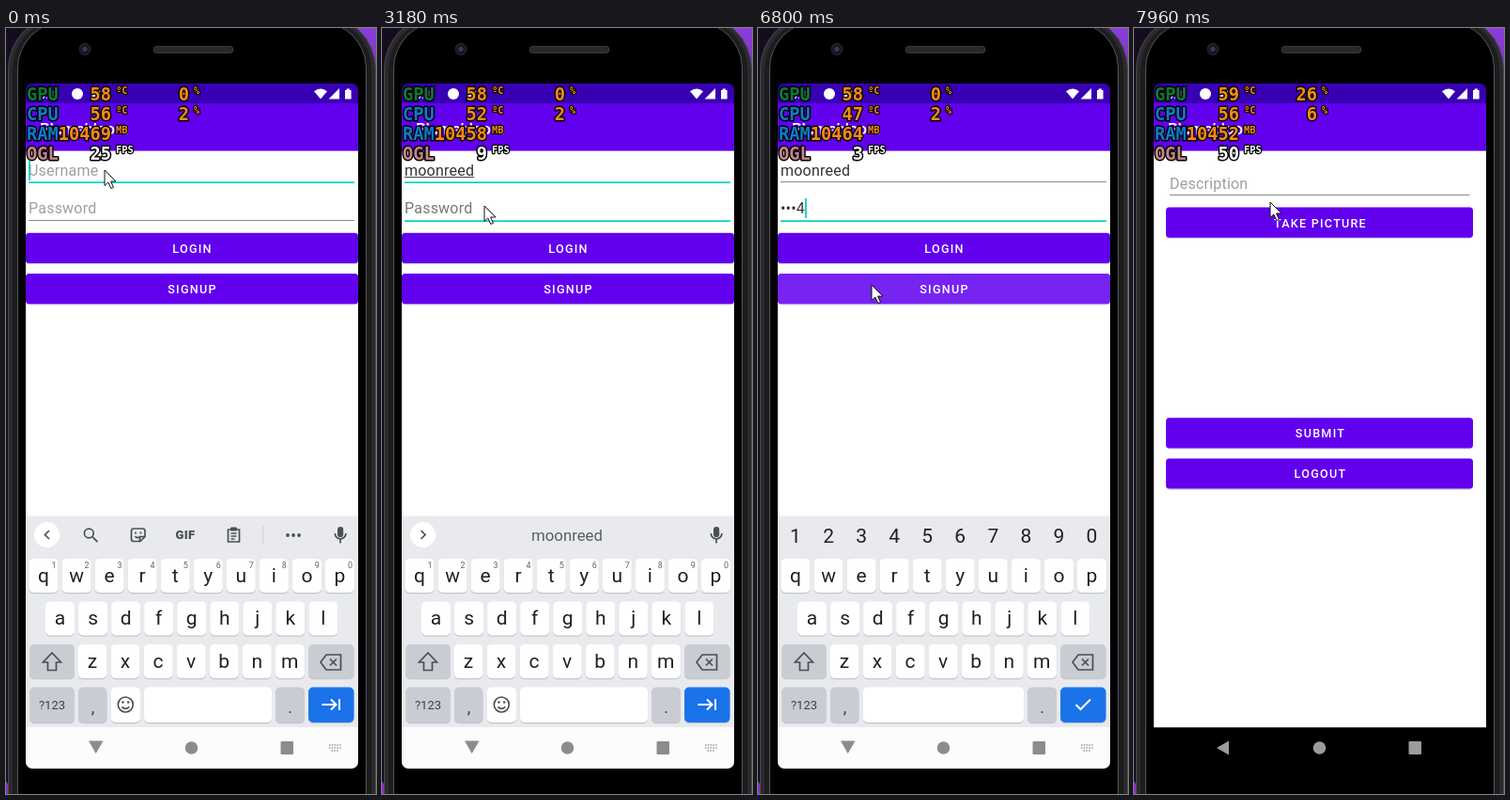
An HTML page for the animation above (8 s loop, 394x814 px).

```html
<!DOCTYPE html>
<html lang="en">
<head>
<meta charset="utf-8">
<title>Phone login</title>
<style>
html, body { margin: 0; width: 100%; height: 100%; overflow: hidden; background: #000; }
svg { display: block; width: 394px; height: 814px; font-family: Roboto, sans-serif; }
.mid { text-anchor: middle; }
.field { font-size: 16px; letter-spacing: .22px; fill: #333; }
.hint { fill: #9f9f9f; }
.btn { font-size: 12.6px; font-weight: 500; letter-spacing: 1.25px; fill: #fff; text-anchor: middle; }
.key { font-size: 21px; fill: #202124; text-anchor: middle; }
.sup { font-size: 9px; fill: #5f6368; text-anchor: middle; }
.word { font-size: 16.8px; fill: #5a5e63; text-anchor: middle; }
.line { fill: none; stroke: #4b4f54; stroke-width: 1.7; }
.hud { font: bold 18.7px "DejaVu Sans Mono", monospace; paint-order: stroke; stroke: #000; stroke-width: 3px; stroke-linejoin: round; }
.hud .unit { font-size: 10.3px; stroke-width: 2.4px; }
.end { text-anchor: end; }
</style>
</head>
<body>
<svg id="stage" viewBox="0 0 394 814"></svg>
<script>
const PURPLE = '#6200ee', TEAL = '#03d0c5';

const rect = (x, y, w, h, fill, r = 0, more = '') =>
  `<rect x="${x}" y="${y}" width="${w}" height="${h}" rx="${r}" fill="${fill}" ${more}/>`;
const text = (x, y, cls, str, more = '') =>
  `<text x="${x}" y="${y}" class="${cls}" ${more}>${str}</text>`;
const path = (d, more = 'class="line"') => `<path d="${d}" ${more}/>`;
const disc = (x, y, r, fill, more = '') =>
  `<circle cx="${x}" cy="${y}" r="${r}" fill="${fill}" ${more}/>`;
const group = (id, body, more = '') => `<g id="${id}" ${more}>${body}</g>`;

const button = (x, y, w, label, glow = '') =>
  rect(x + .5, y + 1, w - 1, 32.5, '#d9d6df', 4) + rect(x, y, w, 32.2, PURPLE, 3.5) + glow +
  text(198.5, y + 21, 'btn', label);

const key = (x, y, w, h, fill = '#fff') =>
  rect(x, y + 1.2, w, h, '#c3c6cb', 5) + rect(x, y, w, h, fill, 5);

const letters = (row, x0, y) => [...row].map((c, i) => {
  const x = x0 + i * 35.05;
  return key(x - 15.5, y, 31, 36) + text(x, y + 24.5, 'key', c);
}).join('');

const digits = (y, cls, dx) => [...'1234567890'].map((c, i) =>
  text(40 + dx + i * 35.05, y, cls, c)).join('');

function phone() {
  return `<defs>
    <linearGradient id="wall" x2="0" y2="1"><stop stop-color="#8a3fd8"/><stop offset=".12" stop-color="#6a2bb0"/><stop offset=".3" stop-color="#1a1022"/><stop offset="1" stop-color="#151018"/></linearGradient>
    <clipPath id="screen"><rect x="21" y="59" width="354" height="728" rx="7"/></clipPath>
    <clipPath id="signupBox"><rect x="21" y="261" width="354" height="32.2" rx="3.5"/></clipPath></defs>` +
    rect(0, 0, 394, 814, '#140d20') + rect(300, 0, 94, 814, 'url(#wall)') +
    path('M0 800V814H8Z', 'fill="#8a2bd8"') +
    rect(2.5, -14, 391, 1000, '#2b2b2e', 58, 'stroke="#4a4a4e"') +
    rect(7, -10, 382, 1000, '#1d1d20', 54) +
    rect(12.5, -7, 371, 1000, '#000', 50, 'stroke="#55555a"') +
    rect(157, 19.5, 85, 7, '#29292c', 3.5, 'stroke="#3a3a3d"') +
    disc(84, 22.5, 6, '#17181d', 'stroke="#2a2b31"') + disc(84, 22.5, 2.5, '#31405f');
}

const appBase = () =>
  rect(21, 130, 354, 613.5, '#fff') + rect(21, 59, 354, 21.5, '#3700b3') +
  rect(21, 80, 354, 50.6, PURPLE) + rect(21, 743.5, 354, 44, '#000') +
  text(36, 113, '', 'Plumebloom', 'font-size="16.6" font-weight="500" fill="#fff"');

const navShapes = (back, fill) => path(back, `fill="${fill}"`) +
  disc(197.5, 765, 6.7, fill) + rect(292.5, 758, 13.5, 14, fill, 1);

const login = () => appBase() +
  text(24, 157, 'field hint', 'Username', 'id="userHint"') + text(24, 157, 'field', '', 'id="user"') +
  rect(24, 158, 0, 1, '#444', 0, 'id="compose"') +
  rect(24, 163, 347, 2, TEAL, 0, 'id="userLine"') +
  text(24, 197, 'field hint', 'Password', 'id="passHint"') + text(24, 197, 'field', '', 'id="pass"') +
  rect(24, 204, 347, 1, '#8c8c8c', 0, 'id="passLine"') +
  rect(24, 141, 1.8, 21, TEAL, 0, 'id="caret"') +
  button(21, 217.7, 354, 'LOGIN') +
  button(21, 261, 354, 'SIGNUP', group('glow',
    rect(21, 261, 354, 33, '#fff', 0, 'opacity=".05"') +
    disc(121, 273, 0, '#fff', 'id="ripple" opacity=".09"'), 'clip-path="url(#signupBox)"'));

const post = () => appBase() +
  text(38, 170.5, 'field hint', 'Description') + rect(38, 177, 319.5, 1, '#8c8c8c') +
  button(34, 190.5, 327, 'TAKE PICTURE') + button(34, 414.2, 327, 'SUBMIT') +
  button(34, 457.4, 327, 'LOGOUT');

function keyboard() {
  const grey = '#c9ccd3';
  const mic = rect(353, 530, 6.2, 11, '#4b4f54', 3.1) + path('M350.3 537a5.8 5.8 0 0 0 11.6 0M356 543.5v4');
  const knob = d => disc(43.5, 538.5, 13.5, '#fff') + path(d);
  const tools = knob('M46 534l-4.5 4.5 4.5 4.5') +
    disc(88.3, 537, 4.9, 'none', 'class="line"') + path('M92 540.7l5.5 5.5') +
    path('M136 532h9.5a2.5 2.5 0 0 1 2.5 2.5v6l-5 5h-7a2.5 2.5 0 0 1-2.5-2.5v-8.5a2.5 2.5 0 0 1 2.5-2.5zM142.5 545v-4.5h5M138 535.5v2M143.5 535.5v2M137.5 540q2 2.5 4 1') +
    text(191, 543, 'mid', 'GIF', 'font-size="13" font-weight="900" fill="#4b4f54" letter-spacing=".4"') +
    path('M236.5 533h12v13h-12zM239.5 537h6M239.5 540h6M239.5 543h4') + rect(239, 530.5, 7, 4, '#4b4f54', 1) +
    rect(273, 529, 1, 20, '#cfd1d6') + [300, 306, 312].map(x => disc(x, 539, 1.9, '#4b4f54')).join('') + mic;
  const words = knob('M41.5 534l4.5 4.5-4.5 4.5') + mic +
    group('bars', rect(145, 528, 1, 22, '#cfd1d6') + rect(248, 528, 1, 22, '#cfd1d6')) +
    [100, 197, 294].map((x, i) => text(x, 545, 'word', '', `id="word${i}"`)).join('');
  const plain = digits(574, 'sup', 11) +
    key(112, 700.5, 31, 37.5) + disc(127.3, 719, 8, 'none', 'class="line"') +
    path('M123.3 721.3q4 4 8 0') + disc(124.5, 716.5, 1.3, '#4b4f54') + disc(130.2, 716.5, 1.3, '#4b4f54') +
    key(147, 700.5, 136, 37.5) +
    path('M336.5 719h14M346 713.5l5.5 5.5-5.5 5.5M355 713v12', 'fill="none" stroke="#fff" stroke-width="2"');
  const secret = digits(546.5, 'key', 0) + key(112, 700.5, 171, 37.5) +
    path('M338.5 719l5 5 10.5-10.5', 'fill="none" stroke="#fff" stroke-width="2"');
  return rect(21, 518.5, 354, 225, '#e8eaee') + rect(21, 743, 354, 44, '#fcfcfc') +
    letters('qwertyuiop', 40, 564) + letters('asdfghjkl', 57.5, 609.5) + letters('zxcvbnm', 92, 655) +
    key(25, 655, 48, 36, grey) + path('M49 664l9.5 10h-5v8.5h-9v-8.5h-5z') +
    key(322, 655, 48.5, 36, grey) + path('M335 674l6-8h15.5v16h-15.5zM345 670.5l7 7M352 670.5l-7 7') +
    key(25, 700.5, 48, 37.5, grey) + text(49, 724, 'mid', '?123', 'font-size="13" fill="#3c4043"') +
    key(77, 700.5, 30.5, 37.5, grey) + text(92.5, 728, 'mid', ',', 'font-size="18" fill="#3c4043"') +
    key(287, 700.5, 31, 37.5, grey) + text(302.5, 728, 'mid', '.', 'font-size="18" fill="#3c4043"') +
    key(322, 700.5, 48.5, 37.5, '#1a73e8') +
    group('tools', tools) + group('words', words) + group('plain', plain) + group('secret', secret) +
    navShapes('M88 757.5H103.5L95.7 771Z', '#8c8c8c') +
    path('M344 762h13M344 765h13M346.5 768h8', 'stroke="#999" stroke-width="1.6" stroke-dasharray="1.6 1.2"');
}

const statusIcons = () =>
  text(35, 74.5, '', '5:31', 'font-size="12" fill="#fff"') + disc(76, 70, 6, '#fff') +
  rect(91, 65, 9, 10, '#fff', 2) +
  path('M328 67.2q7-5.4 14 0l-7 8.3zM355 64v11.5h-11.500zM361 66h1.700v-1.500h3.200v1.500h1.700v9.500h-6.600z', 'fill="#fff"');

function hud() {
  const rows = [['GPU', '#0c7a30', 'ºC'], ['CPU', '#0b7cc8', 'ºC'], ['RAM', '#0b7cc8', 'MB'], ['OGL', '#c88585', 'FPS']];
  const body = rows.map(([name, color, unit], i) => {
    const y = 77 + i * 21, ink = `fill="${i < 3 ? '#ff8a14' : '#fff'}"`;
    return text(22, y, '', name, `fill="${color}"`) +
      text(112, y, 'end', '', `${ink} id="val${i}"`) + text(117, y - 7, 'unit', unit, ink) +
      (i < 2 ? text(195, y, 'end', '', `${ink} id="load${i}"`) + text(200, y - 7, 'unit', '%', ink) : '');
  }).join('');
  return group('hud', body, 'class="hud"');
}

document.getElementById('stage').innerHTML = phone() +
  `<g clip-path="url(#screen)">${group('login', login())}${group('ime', keyboard())}${group('post', post())}` +
  group('nav', navShapes('M101 757.5V772.5L88 765Z', '#9b9b9b')) + `${statusIcons()}</g>` +
  hud() + path('M0 0V16.5L3.8 13L6.9 19.5L9.5 18.3L6.6 12H12Z', 'id="mouse" fill="#fff" stroke="#111"');

const $ = id => document.getElementById(id);
const set = (id, attrs) => { for (const k in attrs) $(id).setAttribute(k, attrs[k]); };
const show = (id, on) => { $(id).style.display = on ? '' : 'none'; };

// Each event overrides part of the state from its time onwards.
const start = {
  gpu: 58, gpuLoad: 0, cpu: 56, cpuLoad: 2, ram: 10469, fps: 25,
  user: '', pass: '', focus: 'user', caret: true, words: null, mouse: [105, 151],
  ripple: 0, oldScale: 1, newScale: 0, fade: 1, ime: true
};
const events = [
  [400, { caret: false, fps: 12 }],
  [540, { user: 'm', caret: true, words: ['m', 'my', 'me'], cpu: 55, ram: 10460, fps: 9 }],
  [690, { user: 'moo', words: ['moo', 'moon', 'mood'] }],
  [840, { user: 'moon', words: ['moon', 'moonlight', 'moonlit'] }],
  [970, { fps: 8 }],
  [1430, { caret: false, cpu: 53, cpuLoad: 3, ram: 10452, fps: 7 }],
  [1860, { user: 'moonr', caret: true, words: ['', 'moonr', ''], fps: 5 }],
  [2110, { user: 'moonre', words: ['moonre'] }],
  [2390, { user: 'moonree', words: ['moonree'], cpu: 52, cpuLoad: 2, ram: 10458, fps: 8 }],
  [2510, { user: 'moonreed', words: ['moonreed'] }],
  [2900, { mouse: [108, 176], fps: 9 }],
  [3030, { mouse: [109, 189], caret: false }],
  [3180, { focus: 'both' }],
  [3320, { focus: 'pass', caret: true }],
  [3720, { caret: false, cpu: 51, ram: 10457, fps: 4 }],
  [4230, { caret: true, fps: 3 }],
  [4510, { pass: '1', cpu: 49, cpuLoad: 1, ram: 10456, fps: 4 }],
  [4820, { pass: '•2', fps: 2 }],
  [5100, { pass: '••3' }],
  [5360, { pass: '•••4', cpu: 48, cpuLoad: 2, ram: 10460, fps: 5 }],
  [5760, { mouse: [115, 200] }],
  [5910, { mouse: [119, 215], caret: false }],
  [6030, { mouse: [124, 233] }],
  [6150, { mouse: [128, 250] }],
  [6270, { mouse: [128, 267] }],
  [6420, { mouse: [121, 273], caret: true, cpu: 47, ram: 10464, fps: 3 }],
  [6540, { ripple: 60 }],
  [6680, { ripple: 170 }],
  [6800, { ripple: 270 }],
  [6950, { oldScale: 1.03, newScale: .96, fade: .6, fps: 9 }],
  [7070, { oldScale: 1.0485, newScale: .994, fade: 1, ime: false, fps: 14 }],
  [7200, { newScale: .998, mouse: [200, 320] }],
  [7320, { newScale: 1, mouse: [280, 334], gpu: 59, gpuLoad: 26, cpu: 56, cpuLoad: 6, ram: 10452, fps: 50 }],
  [7460, { mouse: [268, 319] }],
  [7590, { mouse: [237, 284] }],
  [7710, { mouse: [201, 245] }],
  [7840, { mouse: [167, 208] }],
  [7960, { mouse: [145, 185] }]
];

const zoom = s => `translate(198 423) scale(${s}) translate(-198 -423)`;
const underline = (y, on) => on
  ? { y: y + .3, height: 1.7, fill: TEAL }
  : { y, height: 1, fill: '#8c8c8c' };

function render(s) {
  [s.gpu, s.cpu, s.ram, s.fps].forEach((v, i) => { $('val' + i).textContent = v; });
  [s.gpuLoad, s.cpuLoad].forEach((v, i) => { $('load' + i).textContent = v; });

  const onUser = s.focus !== 'pass', onPass = s.focus !== 'user';
  $('user').textContent = s.user;
  $('pass').textContent = s.pass;
  show('userHint', !s.user);
  show('passHint', !s.pass);
  $('passHint').style.fill = s.focus === 'both' ? '#777' : '';
  show('login', true);
  const width = id => $(id).textContent ? $(id).getComputedTextLength() : 0;
  set('compose', { width: onUser ? width('user') : 0 });
  set('userLine', underline(163, onUser));
  set('passLine', underline(204, onPass));
  set('caret', { x: 24 + width(onPass ? 'pass' : 'user'), y: onPass ? 181 : 141 });
  show('caret', s.caret);

  const hidden = s.focus === 'pass';
  show('plain', !hidden);
  show('secret', hidden);
  show('tools', !hidden && !s.words);
  show('words', !hidden && s.words);
  const words = s.words || [];
  show('bars', words.length === 3);
  const cells = words.length === 1 ? ['', words[0], ''] : words;
  for (let i = 0; i < 3; i++) $('word' + i).textContent = cells[i] || '';

  show('glow', s.ripple > 0);
  set('ripple', { r: s.ripple });
  show('ime', s.ime);
  set('login', { transform: zoom(s.oldScale) });
  show('login', s.newScale < 1);
  show('post', s.newScale > 0);
  show('nav', s.newScale > 0);
  set('post', { transform: zoom(s.newScale || 1), opacity: s.fade });
  set('mouse', { transform: `translate(${s.mouse})` });
}

let shown = -1;
function tick() {
  const t = performance.now() % 8000;
  const count = events.filter(([at]) => at <= t).length;
  if (count !== shown) {
    shown = count;
    render(Object.assign({}, start, ...events.slice(0, count).map(e => e[1])));
  }
  requestAnimationFrame(tick);
}
tick();
</script>
</body>
</html>
```
